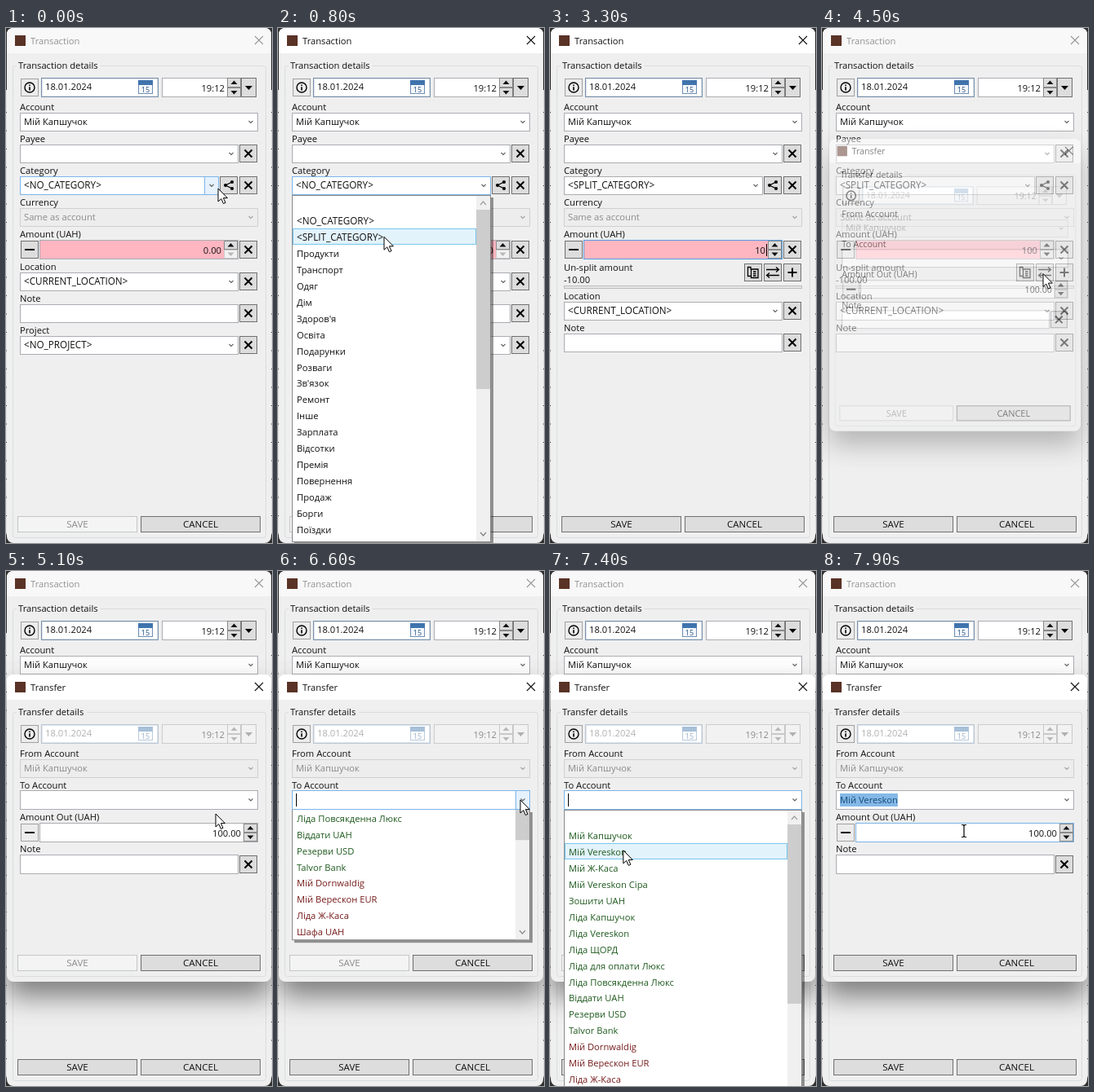
Animation, 326 px wide and 632 px high, one loop 8 s. Source, as an HTML page:

```html
<!DOCTYPE html>
<html lang="uk">
<head>
<meta charset="utf-8">
<title>Transaction</title>
<style>
html, body { margin: 0; width: 100%; height: 100%; overflow: hidden; background: #e4e4e4; }
svg { display: block; width: 326px; height: 632px; }
text { font: 11.2px "Open Sans", "Noto Sans", sans-serif; white-space: pre; }
</style>
</head>
<body>
<svg id="stage" viewBox="0 0 326 632" xmlns="http://www.w3.org/2000/svg"></svg>
<script>
const LOOP = 8000;
const BLUE = '#569de5', HOVER = '#7eb4ea', GREY = '#abadb3', DIM = '#8b8b8b';
const WALLET = 'Мій Капшучок', CARD = 'Мій Vereskon';
const GREEN_ACCOUNTS = [WALLET, CARD, 'Мій Ж-Каса', 'Мій Vereskon Сіра', 'Зошити UAH',
  'Ліда Капшучок', 'Ліда Vereskon', 'Ліда ЩОРД', 'Ліда для оплати Люкс',
  'Ліда Повсякденна Люкс', 'Віддати UAH', 'Резерви USD', 'Talvor Bank'];
const RED_ACCOUNTS = ['Мій Dornwaldig', 'Мій Верескон EUR', 'Ліда Ж-Каса', 'Шафа UAH'];
const toRows = (names, color) => names.map(name => ({ name, color }));
const ACCOUNTS = [{ name: '' }, ...toRows(GREEN_ACCOUNTS, '#1f5a1f'), ...toRows(RED_ACCOUNTS, '#761c1c')];
const CATEGORIES = toRows(['', '<NO_CATEGORY>', '<SPLIT_CATEGORY>', 'Продукти', 'Транспорт',
  'Одяг', 'Дім', 'Здоров\'я', 'Освіта', 'Подарунки', 'Розваги', 'Зв\'язок', 'Ремонт', 'Інше',
  'Зарплата', 'Відсотки', 'Премія', 'Повернення', 'Продаж', 'Борги', 'Поїздки'], '#111');

const stage = document.getElementById('stage');
const clamp = v => Math.max(0, Math.min(1, v));
const ramp = (t, from, to) => clamp((t - from) / (to - from));
const ease = p => p * p * (3 - 2 * p);
const within = (t, from, to) => t >= from && t < to;

const esc = s => s.replace(/&/g, '&amp;').replace(/</g, '&lt;').replace(/>/g, '&gt;');
const fill = (x, y, w, h, color, extra = '') =>
  `<rect x="${x}" y="${y}" width="${w}" height="${h}" fill="${color}" ${extra}/>`;
const box = (x, y, w, h, color, stroke, extra = '') =>
  fill(x + .5, y + .5, w - 1, h - 1, color, `stroke="${stroke}" ${extra}`);
const path = (d, color = '#000', width = 1, extra = '') =>
  `<path d="${d}" fill="none" stroke="${color}" stroke-width="${width}" ${extra}/>`;
const solid = (d, color = '#000') => `<path d="${d}" fill="${color}"/>`;
const label = (x, y, s, color = '#111', anchor = 'start', size = 11.2) =>
  `<text x="${x}" y="${y}" fill="${color}" text-anchor="${anchor}" style="font-size:${size}px">${esc(s)}</text>`;
const group = (attrs, body) => `<g ${attrs}>${body}</g>`;
const value = (x, y, s, color) => label(x, y, s, color, 'start', s[0] === '<' ? 11.7 : 11.2);

function textWidth(s) {
  stage.innerHTML = label(0, 0, s);
  return stage.firstChild.getComputedTextLength();
}

const chevron = (x, y, color = '#606060') => path(`M${x - 2.5} ${y - 1.5}l2.5 2.5l2.5 -2.5`, color, 1.1);

function combo(x, y, w, h, s = '', { state = '', disabled = false } = {}) {
  const stroke = disabled ? '#d0d0d0' : state ? HOVER : GREY;
  let out = box(x, y, w, h, disabled ? '#ededed' : '#fff', stroke);
  if (state === 'hover') out += box(x + w - 18, y, 18, h, '#e5f1fb', HOVER);
  return out + value(x + 5, y + 15, s, disabled ? DIM : '#111')
    + chevron(x + w - 9, y + h / 2, disabled ? '#a0a0a0' : '#606060');
}

const GLYPHS = {
  cross: path('M-4.5 -4.5L4.5 4.5M4.5 -4.5L-4.5 4.5', '#000', 2),
  minus: path('M-6 0H6', '#000', 2),
  plus: path('M-5.5 0H5.5M0 -5.5V5.5', '#000', 2),
  share: path('M4 -4L-4 0L4 4', '#000', 1.3)
    + [[4, -4], [-4, 0], [4, 4]].map(([x, y]) => `<circle cx="${x}" cy="${y}" r="2.1"/>`).join(''),
  swap: path('M-8 -3.5H7M4 -6.5L7.5 -3.5L4 -.5M8 3.5H-7M-4 .5L-7.5 3.5L-4 6.5', '#000', 1.3),
  copy: path('M-3 -3.5V-6.5H-6.5V4.5H-3M-2.5 -4H6V6.5H-2.5ZM0 -1H3.5M0 1.5H3.5M0 4H3.5', '#000', 1.3),
  info: '<circle r="6" fill="none" stroke="#000" stroke-width="1.4"/>' + path('M0 -.8V3.5M0 -3.6V-2', '#000', 1.6)
};
const iconButton = (x, y, glyph, bg = '#ddd', stroke = '#707070') =>
  box(x, y, 22, 22, bg, stroke) + group(`transform="translate(${x + 11} ${y + 11})"`, GLYPHS[glyph]);

function spinner(x, y, h, { upOnly = false, disabled = false } = {}) {
  const arrow = (cy, dir, off) =>
    solid(`M${x + 4.5} ${cy + 2 * dir}h8l-4 ${-4.5 * dir}z`, off ? '#b8b8b8' : '#111');
  const half = h / 2;
  return box(x, y, 17, half, disabled ? '#f2f2f2' : '#ddd', disabled ? '#c8c8c8' : '#8a8a8a')
    + box(x, y + half, 17, half, disabled || upOnly ? '#f2f2f2' : '#ddd', disabled || upOnly ? '#c8c8c8' : '#8a8a8a')
    + arrow(y + half / 2, 1, disabled) + arrow(y + half * 1.5, -1, disabled || upOnly);
}

function pushButton(x, y, s, on = 1) {
  const face = (bg, stroke, color) => box(x, y, 147, 20, bg, stroke) + label(x + 73.5, y + 14, s, color, 'middle', 11.5);
  return face('#f4f4f4', '#c3c6c8', DIM) + (on ? group(`opacity="${on}"`, face('#ddd', '#707070', '#111')) : '');
}

function calendarIcon(x, y) {
  return box(x, y, 18, 17, '#f4f7fb', '#6f8db0') + fill(x, y, 18, 6, '#3f74ad')
    + label(x + 9, y + 14.5, '15', '#28527f', 'middle', 9);
}

function dateRow(disabled) {
  const color = disabled ? '#b0b0b0' : '#111';
  const opacity = disabled ? 'opacity=".45"' : '';
  return iconButton(18, 62, 'info', '#ececec', '#a0a0a0')
    + box(43, 61, 144, 24, '#fff', disabled ? '#bcc6d2' : '#7890aa')
    + box(44, 62, 142, 22, 'none', '#dfe6ee') + label(48, 76, '18.01.2024', color)
    + group(opacity, calendarIcon(162, 64))
    + box(191, 61, 81, 24, disabled ? '#f2f2f2' : '#fff', disabled ? '#ccc' : GREY)
    + label(268, 78, '19:12', disabled ? DIM : '#111', 'end')
    + spinner(271, 61, 24, { disabled })
    + box(288, 61, 19, 24, disabled ? '#f2f2f2' : '#ddd', disabled ? '#c8c8c8' : '#707070')
    + solid('M293 71h9l-4.5 5z', disabled ? '#b0b0b0' : '#000');
}

function frame(title, details, height, active) {
  const bottom = height - 6;
  return fill(1, 0, 324, height, '#efefef', 'rx="8"')
    + solid('M1 31V8Q1 0 9 0H317Q325 0 325 8V31Z', active ? '#fff' : '#f8f8f8')
    + fill(11, 9, 13, 13, '#5a3226')
    + label(30, 20, title, active ? '#111' : '#919191')
    + path('M305 10L315 20M315 10L305 20', active ? '#111' : '#999', 1.1)
    + box(8, 46, 311, bottom - 46, 'none', '#d8dcdf', 'rx="3"')
    + fill(13, 43, details.length * 5.4, 8, '#efefef') + label(15, 50, details);
}

const amountAt = t => t < 3000 ? '0.00' : t < 3300 ? '1' : t < 3600 ? '10' : '100';
const unsplitAt = t => t < 3000 ? '0.00' : `-${amountAt(t)}.00`;

function amountField(t) {
  const focused = within(t, 2200, 4300);
  const stroke = focused ? BLUE : within(t, 1600, 2200) ? HOVER : GREY;
  const selected = within(t, 2400, 3000);
  return label(17, 257, 'Amount (UAH)') + iconButton(18, 261, 'minus')
    + box(41, 260, 244, 24, '#ffb6c1', stroke)
    + (selected ? fill(241, 265, 24, 15, '#84b8e6') : '')
    + label(264, 277, amountAt(t), '#111', 'end')
    + (focused && !selected ? fill(265, 265, 1, 15, '#000') : '')
    + spinner(267, 261, 22, { upOnly: t < 3000 }) + iconButton(286, 261, 'cross');
}

function splitRow(t) {
  return label(17, 298, 'Un-split amount') + label(17, 313, unsplitAt(t))
    + iconButton(238, 289, 'copy') + iconButton(262, 289, 'swap') + iconButton(286, 289, 'plus')
    + box(17, 316, 292, 4, '#e6e6e6', '#bcbcbc');
}

function mainWindow(t) {
  const split = t >= 850, shift = split ? 36 : 0;
  let out = frame('Transaction', 'Transaction details', 632, within(t, 100, 4350)) + dateRow(false)
    + label(17, 101, 'Account') + combo(17, 104, 292, 23, WALLET)
    + label(17, 140, 'Payee') + combo(17, 143, 268, 23) + iconButton(286, 143, 'cross')
    + label(17, 179, 'Category')
    + combo(17, 182, 244, 23, split ? '<SPLIT_CATEGORY>' : '<NO_CATEGORY>', { state: t < 300 ? 'hover' : split ? '' : 'focus' })
    + iconButton(262, 182, 'share') + iconButton(286, 182, 'cross')
    + label(17, 218, 'Currency') + combo(17, 221, 292, 23, 'Same as account', { disabled: true })
    + amountField(t);
  if (split) out += splitRow(t);
  out += label(17, 297 + shift, 'Location') + combo(17, 300 + shift, 268, 23, '<CURRENT_LOCATION>')
    + iconButton(286, 300 + shift, 'cross')
    + label(17, 336 + shift, 'Note') + box(17, 339 + shift, 268, 23, '#fff', GREY)
    + iconButton(286, 339 + shift, 'cross');
  if (!split) out += label(17, 375, 'Project') + combo(17, 378, 268, 23, '<NO_PROJECT>') + iconButton(286, 378, 'cross');
  return out + pushButton(14, 599, 'SAVE', ramp(t, 2980, 3150)) + pushButton(165, 599, 'CANCEL');
}

function transferWindow(t) {
  const open = ease(ramp(t, 4350, 4650));
  if (!open) return '';
  const chosen = t >= 7700, focused = within(t, 6500, 7700);
  const state = within(t, 6000, 6800) ? 'hover' : focused ? 'focus' : '';
  const body = fill(1, 0, 324, 377, '#555', 'rx="8" filter="url(#shadow)"')
    + frame('Transfer', 'Transfer details', 377, true) + dateRow(true)
    + label(17, 101, 'From Account') + combo(17, 104, 292, 23, WALLET, { disabled: true })
    + label(17, 140, 'To Account') + combo(17, 142, 292, 24, '', { state })
    + (chosen ? fill(22, 146, cardWidth, 16, '#84b8e6') + label(22, 158, CARD, '#174a78') : '')
    + (focused ? fill(22, 146, 1, 16, '#000') : '')
    + label(17, 179, 'Amount Out (UAH)') + iconButton(18, 183, 'minus', '#ececec', '#a0a0a0')
    + box(41, 182, 268, 24, '#fff', t >= 7800 ? HOVER : GREY) + label(288, 199, '100.00', '#111', 'end')
    + spinner(291, 183, 22)
    + label(17, 218, 'Note') + box(17, 221, 268, 24, '#fff', GREY) + iconButton(286, 222, 'cross')
    + pushButton(14, 344, 'SAVE', ramp(t, 7680, 7800)) + pushButton(165, 344, 'CANCEL');
  const scale = .9 + .1 * open;
  return group(`opacity="${open}" transform="translate(163 315.5) scale(${scale}) translate(-163 -188.5)"`, body);
}

// The list slides out from under its combo box, so its lower end shows first.
function popup({ top, width, height, rows, shown, hovered, clip }) {
  if (!shown) return '';
  const offset = (shown - 1) * height, right = 17 + width, pitch = 19.95;
  let list = box(17, top, width, height, '#fff', '#8a8a8a');
  rows.forEach((row, i) => {
    const y = top + 1 + i * pitch;
    if (i === hovered) list += box(18, y, width - 19, 20, '#e3f3fc', '#74c5ea');
    list += value(23, y + 15, row.name, row.color);
  });
  list += fill(right - 18, top + 1, 17, height - 2, '#f0f0f0') + fill(right - 18, top + 18, 17, 220, '#cdcdcd')
    + path(`M${right - 13} ${top + 12}l3.5 -4l3.5 4`, '#a0a0a0', 1.2)
    + path(`M${right - 13} ${top + height - 12}l3.5 4l3.5 -4`, '#808080', 1.2);
  return `<clipPath id="${clip}"><rect x="17" y="${top}" width="${width}" height="${height}"/></clipPath>`
    + fill(20, top + 3, width, height * shown, '#000', 'opacity=".4"')
    + group(`clip-path="url(#${clip})"`, group(`transform="translate(0 ${offset})"`, list));
}

const categoryPopup = t => popup({
  top: 205, width: 244, height: 426, rows: CATEGORIES, clip: 'categories',
  shown: t < 850 ? ramp(t, 150, 330) : 0,
  hovered: t < 500 ? 1 : 2
});
const accountPopup = t => popup({
  top: 293, width: 292, height: 361, rows: ACCOUNTS, clip: 'accounts',
  shown: t < 7700 ? ramp(t, 6530, 6690) : 0,
  hovered: t < 7150 ? 0 : t < 7350 ? 1 : 2
});

const POINTER = [[0, 260, 197], [300, 258, 200], [750, 130, 256], [1000, 130, 258], [1800, 243, 276],
  [2200, 256, 273], [3899, 256, 273], [4100, 270, 299], [4300, 272, 301], [4700, 270, 302],
  [5100, 257, 298], [5300, 257, 298], [6000, 295, 283], [6500, 297, 281], [6700, 297, 281],
  [7000, 106, 315], [7500, 88, 346], [7700, 88, 346], [7900, 174, 319], [8000, 174, 319]];

function pointer(t) {
  if (within(t, 3000, 3900)) return '';
  const i = POINTER.findIndex(p => p[0] > t);
  const [t0, x0, y0] = POINTER[i - 1], [t1, x1, y1] = POINTER[i];
  const p = ease(ramp(t, t0, t1));
  const x = x0 + (x1 - x0) * p, y = y0 + (y1 - y0) * p;
  const beam = within(t, 1600, 3000) || within(t, 3900, 4000) || t >= 7800;
  const shape = beam
    ? path('M-3 -7.5H-1L0 -6.5L1 -7.5H3M0 -6.5V6.5M-3 7.5H-1L0 6.5L1 7.5H3', '#000', 1.2)
    : '<path d="M0 0V16L3.8 12.6L6.4 18.5L9 17.4L6.4 11.6H11.4Z" fill="#fff" stroke="#000"/>';
  return group(`transform="translate(${x.toFixed(2)} ${y.toFixed(2)})"`, shape);
}

const DEFS = '<filter id="shadow" x="-20%" y="-20%" width="140%" height="150%">'
  + '<feGaussianBlur stdDeviation="17"/><feOffset dy="18"/>'
  + '<feComponentTransfer><feFuncA type="linear" slope=".75"/></feComponentTransfer></filter>';

function backdrop() {
  let out = fill(0, 0, 326, 632, '#e4e4e4') + fill(0, 0, 326, 76, '#303030') + fill(0, 622, 326, 10, '#303030');
  for (let y = 103; y < 622; y += 22.5) out += fill(0, y, 326, 1, '#404040');
  return out;
}

const cardWidth = textWidth(CARD);
const background = `<defs>${DEFS}</defs>` + backdrop();
const start = performance.now();

function render(t) {
  stage.innerHTML = background + mainWindow(t) + categoryPopup(t) + transferWindow(t) + accountPopup(t) + pointer(t);
}

function tick() {
  render((performance.now() - start) % LOOP);
  requestAnimationFrame(tick);
}
tick();
</script>
</body>
</html>
```
